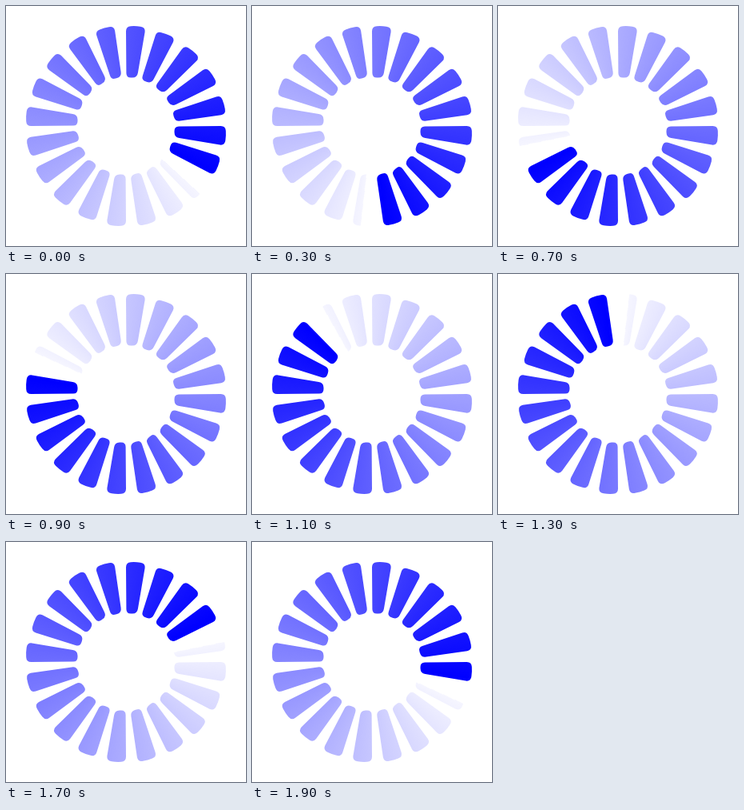
These frames come from a looping animation (300x300 px, 2000 ms). An HTML page:

```html
<!DOCTYPE html>
<html lang="en">
<head>
<meta charset="utf-8">
<title>Spinner</title>
<style>
  html, body { margin: 0; width: 100%; height: 100%; overflow: hidden; background: #fff; }
  svg { position: absolute; width: 0; height: 0; }
  #ring {
    position: absolute; inset: 0; max-width: 300px; max-height: 300px;
    overflow: hidden; contain: strict; clip-path: url(#bars);
  }
  #sweep {
    width: 300px; height: 300px;
    background: conic-gradient(from 132.5deg, #f5f5ff 0deg, #00f 345deg 351deg, #fff 351deg);
  }
</style>
</head>
<body>
<svg><clipPath id="bars" clipPathUnits="userSpaceOnUse"></clipPath></svg>
<div id="ring"><div id="sweep"></div></div>
<script>
  const COUNT = 20;
  const LOOP = 2000;
  const BAR = "M150 31.5 Q150 25.5 156 25.2 Q162 24.8 168 25.7 Q174.3 26.5 173.6 32.5 " +
              "L164.9 83.5 Q164 89.5 158 89.5 L156 89.5 Q150.5 89.5 150.4 84 Z";

  const bars = document.getElementById("bars");
  for (let i = 0; i < COUNT; i++) {
    const bar = document.createElementNS("http://www.w3.org/2000/svg", "path");
    bar.setAttribute("d", BAR);
    bar.setAttribute("transform", `rotate(${i * 360 / COUNT} 150 150)`);
    bars.append(bar);
  }

  document.getElementById("sweep").animate(
    [{ transform: "rotate(0deg)" }, { transform: "rotate(360deg)" }],
    { duration: LOOP, iterations: Infinity, easing: `steps(${COUNT}, end)` }
  );
</script>
</body>
</html>
```
